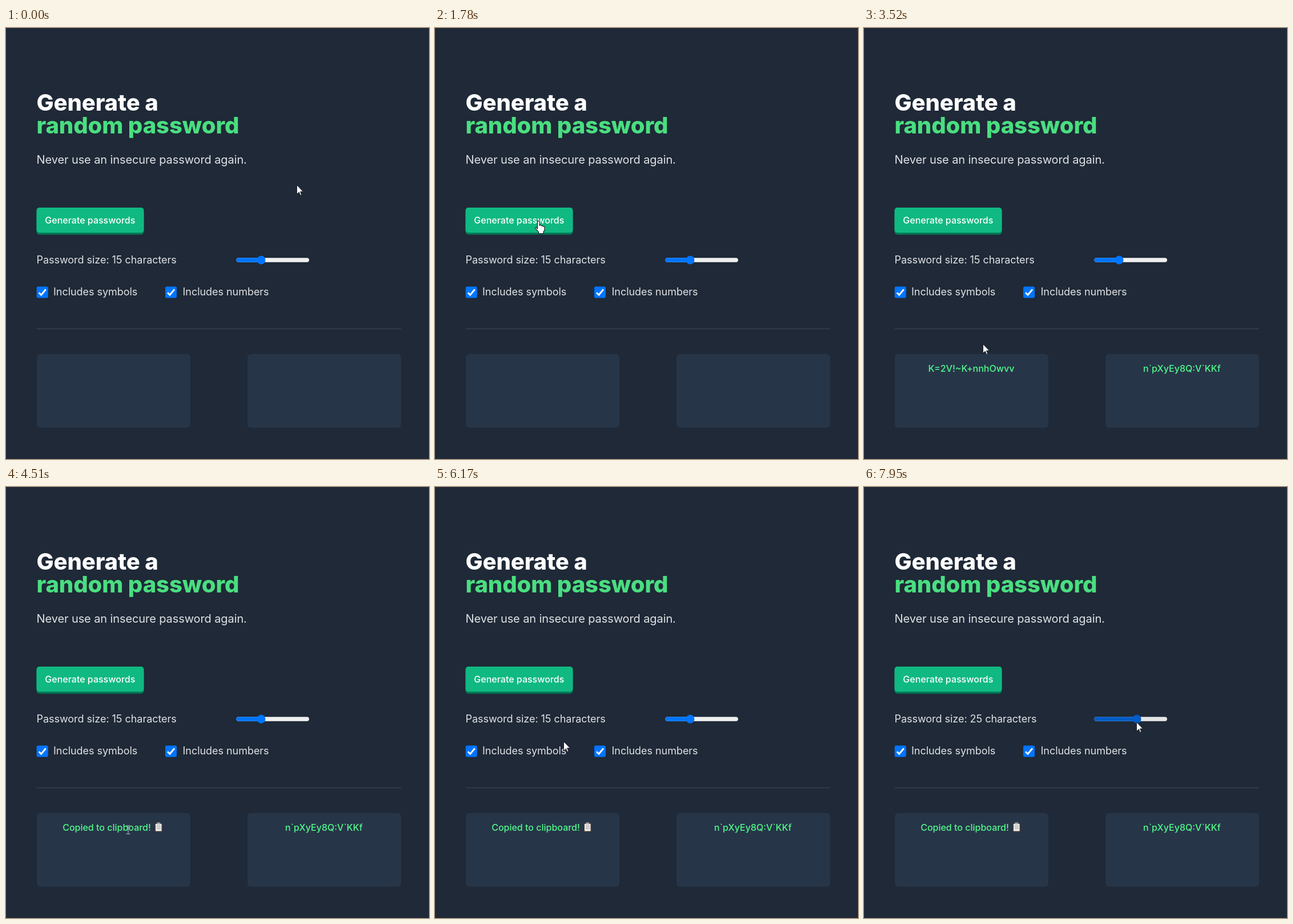
Recreate the animation shown at these times as an HTML page. Size 741 by 756 pixels, loop 8 s.

```html
<!DOCTYPE html>
<html lang="en">
<head>
<meta charset="utf-8">
<title>Password generator</title>
<style>
  html, body { margin: 0; width: 100%; height: 100%; overflow: hidden; background: #1f2937; }
  svg { display: block; width: 741px; height: 756px; }
  text { font-family: Inter, sans-serif; font-optical-sizing: none; fill: #e0e2e5; }
  .title { font-size: 40px; font-weight: 800; letter-spacing: -.1px; fill: #fff; }
  .title.green { fill: #4ade80; }
  .lead { font-size: 20px; letter-spacing: -.1px; }
  .label { font-size: 18px; letter-spacing: -.04px; }
  .button { font-size: 16px; font-weight: 500; fill: #fff; text-anchor: middle; }
  .password { font-size: 16px; font-weight: 500; fill: #50fa8c; text-anchor: middle; }
</style>
</head>
<body>
<svg viewBox="0 0 741 756">
  <defs>
    <g id="check">
      <rect width="20" height="20" rx="2.5" fill="#0075ff"/>
      <path d="M4 10.7l4 4 8-9.7" fill="none" stroke="#fff" stroke-width="2.8"/>
    </g>
    <rect id="card" y="572" width="269" height="129" rx="6" fill="#273548"/>
  </defs>

  <text class="title" x="53.5" y="145">Generate a</text>
  <text class="title green" x="53.5" y="185">random password</text>
  <text class="lead" x="53.5" y="238">Never use an insecure password again.</text>

  <rect x="53.5" y="319" width="188" height="43.5" rx="5" fill="#047857"/>
  <rect id="button" x="53.5" y="315" width="188" height="44" rx="5"/>
  <text class="button" x="147.3" y="343">Generate passwords</text>

  <text id="size" class="label" x="53.5" y="413"></text>
  <rect id="track" x="403.5" y="403.2" width="127.5" height="7.6" rx="3.8"/>
  <rect id="fill" x="403.5" y="403.2" height="7.6" rx="3.8"/>
  <circle id="thumb" cy="407" r="7.5"/>

  <use href="#check" x="53.7" y="453.5"/>
  <text class="label" x="83" y="469">Includes symbols</text>
  <use href="#check" x="279" y="453.5"/>
  <text class="label" x="309.5" y="469">Includes numbers</text>

  <rect x="54" y="526.8" width="638" height="1.4" fill="#354354"/>
  <use href="#card" x="54"/>
  <use href="#card" x="423"/>

  <text id="first" class="password" x="188" y="602.5">K=2V!~K+nnhOwvv</text>
  <text id="second" class="password" x="557" y="602.5">n`pXyEy8Q:V`KKf</text>
  <g id="copied">
    <text class="password" x="176.5" y="602.5">Copied to clipboard!</text>
    <rect x="260.5" y="589.5" width="13.5" height="15.5" rx="1.2" fill="#4a3b34"/>
    <rect x="262" y="591" width="10.5" height="12.5" fill="#f1f1f1"/>
    <rect x="264" y="588.5" width="6.5" height="3.5" rx="1.5" fill="#a7adb2"/>
    <path d="M263.5 594.5h7.5m-7.5 2.5h7.5m-7.5 2.5h7.5" stroke="#9a9a9a"/>
  </g>

  <g id="pointer">
    <circle id="press" cy="-.5" r="11.7" fill="#ff0" fill-opacity=".5"/>
    <path id="arrow" d="M.5.5v16l3.8-3.6 2.4 5.6 2.2-1-2.4-5.5h5z" fill="#fff" stroke="#111820" stroke-width=".9"/>
    <path id="hand" d="M-1.5 14V2.2a1.7 1.7 0 0 1 3.4 0V8q3-1 3.3 1 2.8-.7 3 1 2.8-.6 2.8 1.6V16l-2 4v2.5H.5V20L-5 13.5q-.6-2.4 1.6-1.6z" fill="#fff" stroke="#111" stroke-width="1.1"/>
    <path id="beam" d="M-3.5-7h7M0-7v14.5M-3.5 7.5h7" fill="none" stroke="#b4bac0" stroke-width="1.1"/>
  </g>
</svg>
<script>
const LOOP = 8000, STEP = 66.2;
const $ = id => document.getElementById(id);
const set = (id, attrs) => { for (const k in attrs) $(id).setAttribute(k, attrs[k]); };
const show = (id, on) => set(id, { display: on ? 'inline' : 'none' });

const home = { x: 509, y: 275 };
const moves = [
  { from: 730, to: 1800, x: 181, y: 338 },   // to the button
  { from: 2780, to: 3850, x: 214, y: 601 },  // to the first password
  { from: 5190, to: 6170, x: 225, y: 446 },  // back up
  { from: 6170, to: 6760, x: 442, y: 412 },  // to the slider
  { from: 6930, to: 7010, x: 445, y: 409 },  // onto the thumb
  { from: 7210, to: 7800, x: 477, y: 412 }   // drag
];

const easeOut = u => 1 - (1 - u) ** 1.5;

function pointerAt(t) {
  let { x, y } = home;
  for (const m of moves) {
    const k = easeOut(Math.min(1, Math.max(0, (t - m.from) / (m.to - m.from))));
    x += (m.x - x) * k;
    y += (m.y - y) * k;
  }
  return [Math.round(x), Math.round(y)];
}

function draw(t) {
  const within = (a, b) => t >= a && t < b;
  const [x, y] = pointerAt(Math.floor(t / STEP + .15) * STEP);
  const clicking = within(2250, 2310);
  const dragging = within(7220, 7950);
  const released = t >= 7950;
  const onButton = x >= 54 && x <= 241 && y >= 315 && y <= 363;
  const onText = y > 587;

  set('pointer', { transform: `translate(${x} ${y})` });
  show('hand', onButton);
  show('beam', onText);
  show('arrow', !onButton && !onText);
  show('press', clicking || within(4450, 4510) || dragging);

  set('button', { fill: clicking ? '#0ea674' : '#10b981' });
  show('first', within(2310, 4510));
  show('second', t >= 2310);
  show('copied', t >= 4510);

  const value = dragging || released ? 15 + Math.round((x - 445) / 3.2) : 15;
  const thumbX = 447 + (value - 15) * 3.1;
  const [accent, track] = dragging ? ['#3793ff', '#f5f5f5']
    : t >= 6760 ? ['#005cc8', '#e5e5e5'] : ['#0075ff', '#efefef'];
  set('track', { fill: track });
  set('fill', { fill: accent, width: thumbX - 403.5 });
  set('thumb', { fill: accent, cx: thumbX });
  $('size').textContent = `Password size: ${released ? value : 15} characters`;
}

const start = performance.now();
function tick() {
  draw((performance.now() - start) % LOOP);
  requestAnimationFrame(tick);
}
tick();
</script>
</body>
</html>
```
